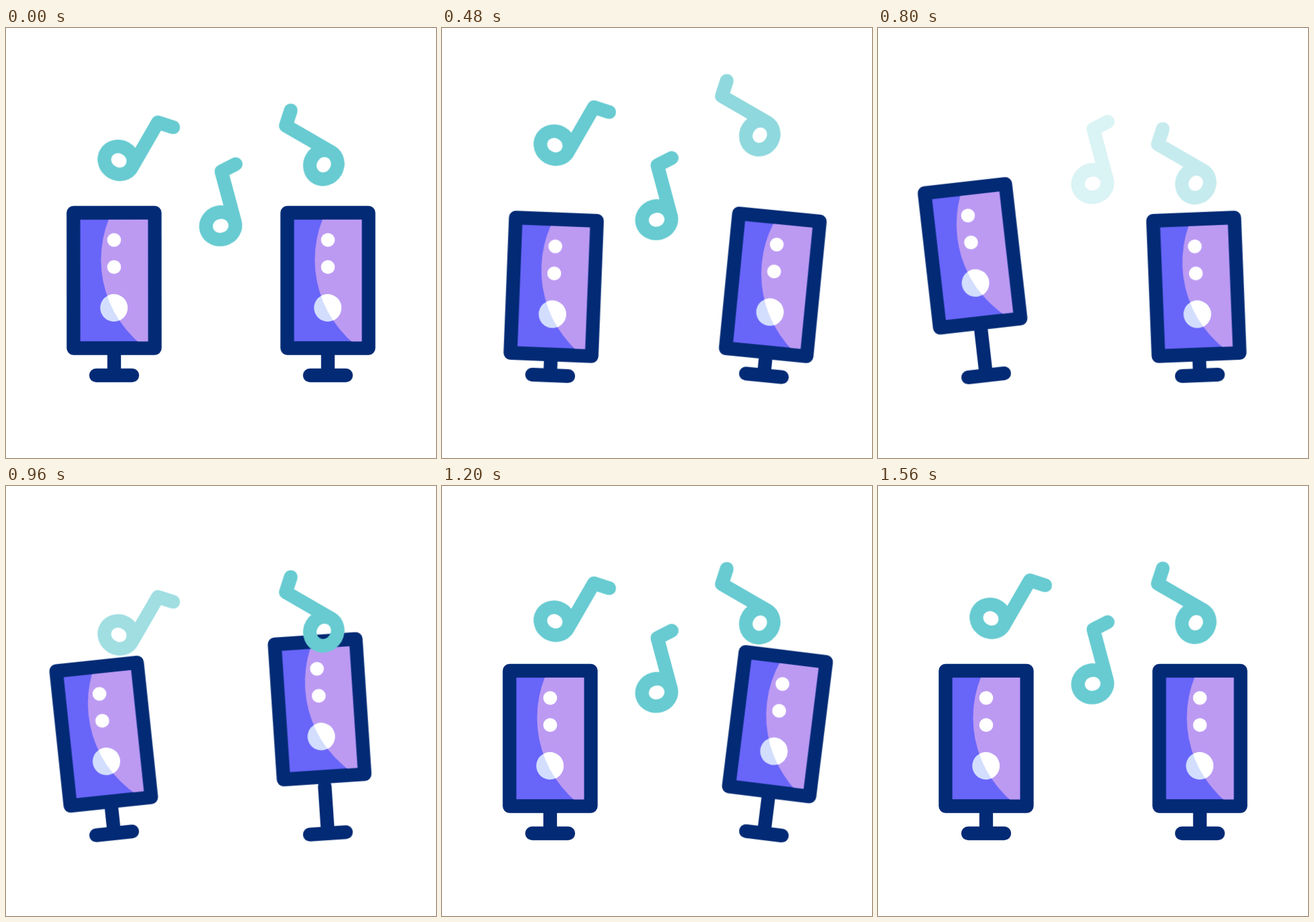
Recreate the animation shown at these times as an HTML page. Size 640 by 640 pixels, loop 1600 ms.

```html
<!DOCTYPE html>
<html lang="en">
<head>
<meta charset="utf-8">
<title>Dancing speakers</title>
<style>
  html, body { margin: 0; width: 100%; height: 100%; overflow: hidden; background: #fff; }
  svg { display: block; width: 100%; height: 100%; }

  .sway, .bob, .pulse, .note {
    animation-duration: 1600ms;
    animation-iteration-count: infinite;
    animation-delay: var(--delay);
  }
  .sway { animation-name: sway; }
  .bob { animation-name: bob; }
  .pulse { animation-name: pulse; transform-origin: -.3px -100.5px; }
  .note { animation-name: rise, fade; animation-timing-function: linear; }

  .frame { fill: #6865f9; stroke: #022a75; stroke-width: 20.3; stroke-linejoin: round; }
  .stand { fill: none; stroke: #022a75; stroke-width: 20.3; stroke-linecap: round; }
  .note path, .note ellipse {
    fill: none; stroke: #67cbd1; stroke-width: 20.3;
    stroke-linecap: round; stroke-linejoin: round;
  }

  /* --side mirrors the dance for the right speaker */
  @keyframes sway {
    0% { transform: rotate(0deg); animation-timing-function: cubic-bezier(.33, .55, .65, 1); }
    17.5% { transform: rotate(calc(var(--side) * -7.1deg)); }
    18.75% { transform: rotate(calc(var(--side) * -7.1deg)); animation-timing-function: cubic-bezier(.25, 0, .3, 1); }
    37.5% { transform: rotate(calc(var(--side) * 3.8deg)); }
    41.875% { transform: rotate(calc(var(--side) * 3.8deg)); animation-timing-function: cubic-bezier(.25, 0, .3, 1); }
    53.125% { transform: rotate(calc(var(--side) * -7.15deg)); animation-timing-function: cubic-bezier(.7, 0, .7, 1); }
    70%, 100% { transform: rotate(0deg); }
  }
  @keyframes bob {
    0% { transform: translateY(0); animation-timing-function: cubic-bezier(.4, .2, .8, .9); }
    24.375% { transform: translateY(17px); animation-timing-function: cubic-bezier(.6, 0, .6, 1); }
    42.5% { transform: translateY(-46.7px); animation-timing-function: cubic-bezier(.45, 0, .6, 1); }
    66.25%, 100% { transform: translateY(0); }
  }
  @keyframes pulse {
    0%, 11.25% { transform: scale(1); animation-timing-function: ease-in-out; }
    21.25% { transform: scale(1.28); animation-timing-function: ease-in-out; }
    30.625%, 100% { transform: scale(1); }
  }
  @keyframes rise {
    0% { transform: translateY(0); animation-timing-function: cubic-bezier(.39, 0, .69, .28); }
    37.5% { transform: translateY(-73.7px); animation-timing-function: step-start; }
    46.25% { transform: translateY(30px); animation-timing-function: cubic-bezier(.3, .1, .4, 1); }
    80%, 100% { transform: translateY(0); }
  }
  @keyframes fade {
    0%, 27.5% { opacity: 1; }
    37.5%, 46.25% { opacity: 0; }
    56.25%, 100% { opacity: 1; }
  }
</style>
</head>
<body>
<svg id="stage" viewBox="0 0 640 640">
  <defs>
    <clipPath id="screen"><rect x="-50.4" y="-231.7" width="100.8" height="181.2"/></clipPath>
    <clipPath id="glow"><circle cx="143.5" cy="-172" r="163"/></clipPath>
  </defs>
</svg>
<script>
  // Origin is the centre of the foot, around which the speaker sways.
  const speaker = (x, side, delay) => `
    <g transform="translate(${x} 517)" style="--side:${side};--delay:${delay}ms">
      <g class="sway">
        <path class="stand" d="M-27 0H27M0 0V-70"/>
        <g class="bob">
          <rect class="frame" x="-60.5" y="-242" width="121" height="201.5"/>
          <g clip-path="url(#screen)"><circle cx="143.5" cy="-172" r="163" fill="#bc9af2"/></g>
          <circle cy="-201.5" r="10.3" fill="#fff"/>
          <circle cy="-161.2" r="10.3" fill="#fff"/>
          <circle class="pulse" cx="-.3" cy="-100.5" r="20.4" fill="#d3defe"/>
          <g clip-path="url(#glow)">
            <circle class="pulse" cx="-.3" cy="-100.5" r="20.4" fill="#fff"/>
          </g>
        </g>
      </g>
    </g>`;

  // Origin is the centre of the note head.
  const note = (x, y, angle, delay) => `
    <g class="note" style="--delay:${delay}ms">
      <g transform="translate(${x} ${y}) rotate(${angle})">
        <ellipse rx="22" ry="20.3"/>
        <path d="M22 0V-78L45.5 -83"/>
      </g>
    </g>`;

  document.getElementById('stage').insertAdjacentHTML('beforeend',
    speaker(161, 1, 0) +
    speaker(479.1, -1, -1280) +
    note(168, 197, 30, -1480) +
    note(319.5, 294.5, -15, -1360) +
    note(473, 203.5, -60, 0));
</script>
</body>
</html>
```
